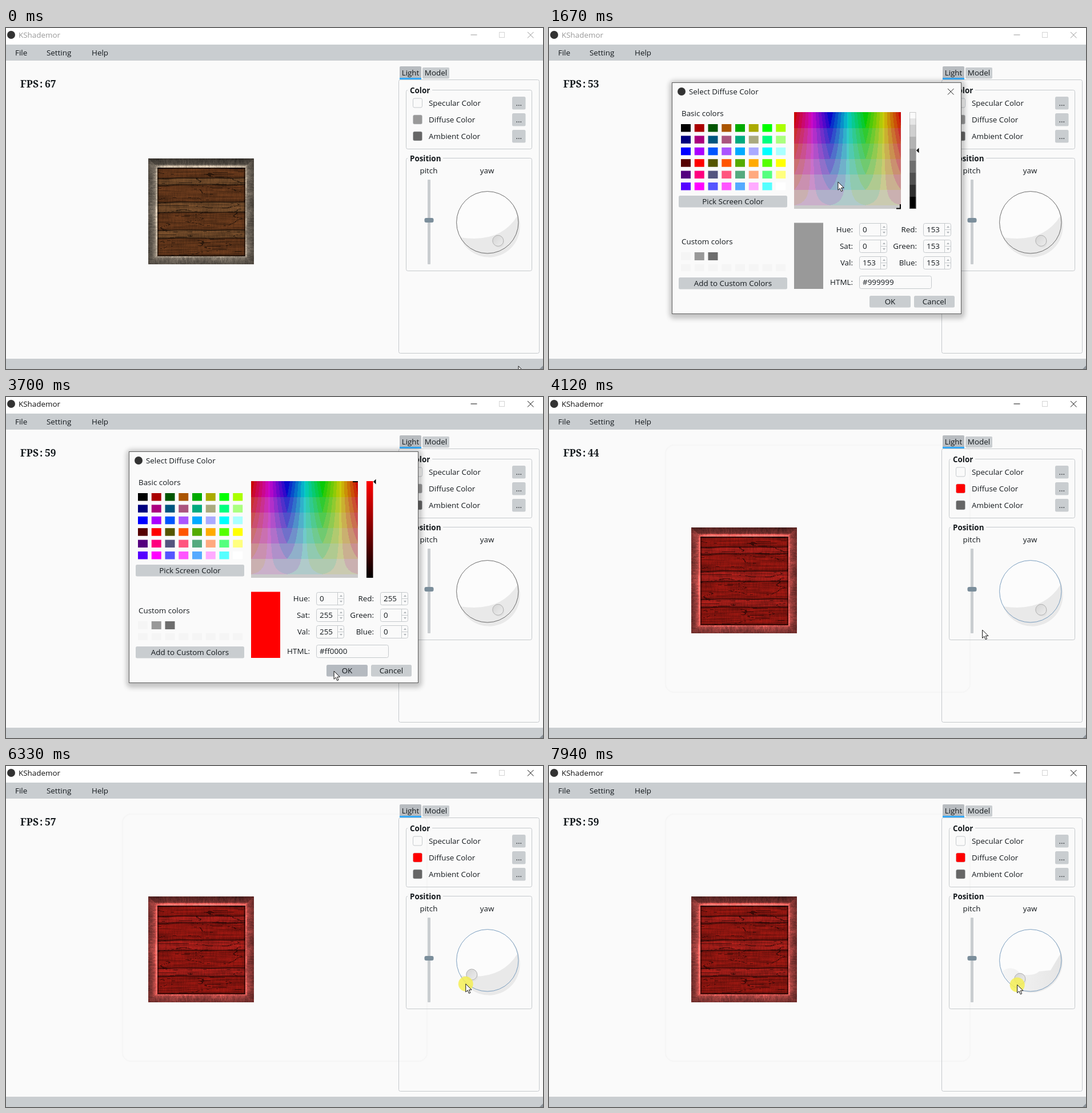
Recreate the animation shown at these times as an HTML page with a canvas. Size 940 by 596 pixels, loop 8 s.

```html
<!DOCTYPE html>
<html lang="en">
<head>
<meta charset="utf-8">
<title>Light settings</title>
<style>
html, body { margin: 0; width: 100%; height: 100%; overflow: hidden; background: #fafafa; }
svg { display: block; }
canvas { display: block; }
text { font: 13.4px "Open Sans", "Noto Sans", sans-serif; fill: #14191d; white-space: pre; }
.b { font-weight: 700; }
.fps { font: 600 17.5px "Noto Serif", serif; }
.btn { fill: #c9cdd0; }
.box { fill: none; stroke: #c5c9cc; }
</style>
</head>
<body>
<svg id="stage" width="940" height="596" viewBox="0 0 940 596">
  <defs>
    <filter id="soft" x="-10%" y="-10%" width="120%" height="120%"><feGaussianBlur stdDeviation="4"/></filter>
    <linearGradient id="fade" x1="0" y1="0" x2="1" y2="0"><stop stop-color="#f5f5f5"/><stop offset="1" stop-color="#e5e5e5"/></linearGradient>
    <linearGradient id="knob" x1="0" y1="0" x2="1" y2="1"><stop stop-color="#d4d4d4"/><stop offset="1" stop-color="#eee"/></linearGradient>
    <linearGradient id="redBar" x1="0" y1="0" x2="0" y2="1"><stop stop-color="#f00"/><stop offset="1"/></linearGradient>
  </defs>
</svg>
<script>
const LOOP = 8000;
const stage = document.getElementById('stage');
const $ = id => document.getElementById(id);

// ---- markup helpers
const rect = (x, y, w, h, a = '') => `<rect x="${x}" y="${y}" width="${w}" height="${h}" ${a}/>`;
const text = (x, y, s, a = '') => `<text x="${x}" y="${y}" ${a}>${s}</text>`;
const path = (d, a = '') => `<path d="${d}" ${a}/>`;
const mid = 'text-anchor="middle"', end = 'text-anchor="end"';
const button = (id, x, y, w, h, s) =>
  rect(x, y, w, h, `id="${id}" class="btn" rx="2.5"`) + text(x + w / 2, y + h / 2 + 5, s, mid);
const canvasBox = (id, x, y, w, h) =>
  `<foreignObject x="${x}" y="${y}" width="${w}" height="${h}"><canvas id="${id}" width="${w}" height="${h}"></canvas></foreignObject>`;
const group = (id, s) => `<g id="${id}">${s}</g>`;
const range = n => [...Array(n).keys()];

// ---- dial geometry
const DIAL = { x: 842.8, y: 339.8, r: 54.2, reach: 37 };

function frameMarkup() {
  return rect(0, 0, 940, 29, 'fill="#fff"') +
    '<circle cx="9" cy="12" r="7" fill="#333"/>' + text(22, 17, 'KShademor', 'id="title"') +
    path('M813.5 12h11M913 7l10.5 10.5M923.5 7L913 17.5', 'id="winBtns" fill="none"') +
    rect(863.5, 7.5, 9, 9, 'fill="none" stroke="#d4d4d4"') +
    rect(0, 29, 940, 28, 'class="btn"') +
    text(16, 48, 'File') + text(71, 48, 'Setting') + text(150, 48, 'Help') +
    rect(0, 578, 940, 18, 'class="btn"') +
    path('M934 596l6-6v6z', 'fill="#8b9299"') +
    text(25, 104, 'FPS', 'class="fps"') + text(59, 104, ':', 'class="fps"') + text(68, 104, '', 'id="fps" class="fps"');
}

function panelMarkup() {
  const rows = ['Specular', 'Diffuse', 'Ambient'].map((name, i) => {
    const y = 120 + 29 * i;
    return rect(712.5, y + 3, 16, 16, `id="sw${i}" rx="2.5" stroke="#c5c9cc" stroke-width="${i ? .5 : 1}" fill="${['#fafafa', '#999', '#666'][i]}"`) +
      text(740, y + 16, name + ' Color') + button('more' + i, 886, y, 23.5, 22.5, '...');
  }).join('');
  const box = (y, h, name, w) => rect(700.5, y, 220, h, 'class="box" rx="3"') +
    rect(703, y - 3, w, 6, 'fill="#fafafa"') + text(707, y + 5.5, name, 'class="b"');
  const { x, y, r } = DIAL;
  return rect(687.5, 90.5, 246, 478, 'class="box" rx="3"') +
    rect(689, 67, 38, 23, 'rx="2" fill="#b8bcc0"') + rect(689, 87, 38, 3, 'fill="#36a9f6"') +
    rect(729, 69, 47, 19.5, 'class="btn" rx="2"') +
    text(708, 83, 'Light', mid) + text(752.5, 83, 'Model', mid) +
    box(108.5, 103, 'Color', 43) + rows + box(227.5, 197, 'Position', 62) +
    text(740, 254, 'pitch', mid) + text(842, 254, 'yaw', mid) +
    rect(738, 265, 5, 148, 'class="btn" rx="1"') + rect(732.5, 332, 16, 8, 'rx="3" fill="#7b8e9b"') +
    `<circle cx="${x + 1.6}" cy="${y + 1.6}" r="${r + .5}" fill="#e8e8e8"/><circle cx="${x}" cy="${y}" r="${r}" fill="#fcfcfc"/>` +
    path('', 'id="shade"') +
    `<circle id="ring" cx="${x}" cy="${y}" r="${r}" fill="none" stroke-width=".9"/>` +
    group('knobAt', '<circle cx="2" cy="3" r="9" fill="#dcdcdc" opacity=".6"/><circle r="9.5" fill="url(#knob)" stroke="#b0b0b0"/>');
}

function dialogMarkup() {
  const basic = range(48).map(i => {
    const b = i % 3, r = (i / 3 | 0) % 4, g = i / 12 | 0;
    return rect(231 + 23.75 * (i / 6 | 0), 168 + 20.4 * (i % 6), 17, 13.5,
      `fill="rgb(${r * 85},${g * 85},${Math.floor(b * 127.5)})"`);
  }).join('');
  const custom = ['#f5f5f5', '#999', '#6d6d6d'].map((c, i) => rect(231 + 23.75 * i, 392, 17, 14, `fill="${c}"`)).join('') +
    range(8).map(i => rect(231 + 23.75 * i, 413, 17, 12, 'fill="#f5f5f5"')).join('');
  const spin = (id, x, y, label) => text(x - 11, y + 16, label, end) +
    rect(x + .5, y + .5, 48, 22, 'class="box" rx="3"') + path(`M${x + 37.5} ${y + 1}v21M${x + 38} ${y + 11.5}h10`, 'class="box"') +
    path(`M${x + 41} ${y + 8}l2.5-3 2.5 3zM${x + 41} ${y + 15}l2.5 3 2.5-3z`, 'fill="#aeb3b7"') +
    text(x + 6, y + 16, '', `id="${id}"`);
  const spins = ['Hue', 'Sat', 'Val', 'Red', 'Green', 'Blue'].map((n, i) =>
    spin('num' + i, i < 3 ? 543 : 655, 341 + 29 * (i % 3), n + ':')).join('');
  const grays = [250, 230, 207, 179, 148, 110, 80, 46, 0].map((v, i) => {
    const y = i < 2 ? 147 + 11 * i : 169 + 21 * (i - 2);
    return rect(631, y, 11.5, i < 2 ? 11 : 21, `fill="rgb(${v},${v},${v})"`);
  }).join('');
  return rect(211, 92, 517, 416, 'rx="8" fill="#000" opacity=".22" filter="url(#soft)"') +
    rect(215.5, 95.5, 506, 404, 'fill="#fafafa" stroke="#5c5c5c"') +
    '<circle cx="232" cy="111" r="7" fill="#333"/>' + text(245, 116, 'Select Diffuse Color') +
    path('M698 106l10.5 10.5M708.5 106L698 116.5', 'id="dlgX" stroke="#222"') +
    text(232, 154, 'Basic colors') + basic + button('pick', 227, 293, 190, 20.5, 'Pick Screen Color') +
    text(232, 378, 'Custom colors') + custom + button('add', 227, 436, 190, 20.5, 'Add to Custom Colors') +
    canvasBox('hues', 429, 147, 187, 169) + path('', 'id="cross" stroke="#000" stroke-width="2" fill="none"') +
    group('grayBar', grays + rect(631.5, 147.5, 10.5, 168, 'fill="none" stroke="#999" stroke-opacity=".5"')) +
    rect(631, 147, 11.5, 169, 'id="red" fill="url(#redBar)"') + path('', 'id="mark"') +
    rect(429, 340.5, 51, 115.5, 'id="preview"') + spins +
    text(532, 449, 'HTML:', end) + rect(543.5, 433.5, 126, 22, 'class="box" rx="3"') + text(549, 449, '', 'id="html"') +
    button('ok', 561, 468, 72, 20.5, 'OK') + button('cancel', 639, 468, 71, 20.5, 'Cancel');
}

stage.insertAdjacentHTML('beforeend',
  frameMarkup() +
  rect(204, 84, 533, 432, 'id="trace" rx="15" fill="none" stroke="#f6f6f6" stroke-width="2.5"') +
  group('wood', canvasBox('crate', 249, 228, 185, 185)) +
  group('woodRed', canvasBox('crateRed', 249, 228, 185, 185)) +
  panelMarkup() + group('dialog', dialogMarkup()) +
  '<circle id="press" r="13" fill="#f4ee55" opacity=".85"/>' +
  path('M0 0v14.2l3.3-3 2.3 5.3 2.4-1-2.3-5.2h4.6z', 'id="cursor" fill="#fff" stroke="#111" stroke-linejoin="round"'));

// ---- pixel textures
function fillPixels(id, shader) {
  const c = $(id), ctx = c.getContext('2d'), img = ctx.createImageData(c.width, c.height);
  for (let y = 0, p = 0; y < c.height; y++)
    for (let x = 0; x < c.width; x++, p += 4) {
      const rgb = shader(x, y);
      for (let k = 0; k < 3; k++) img.data[p + k] = rgb[k];
      img.data[p + 3] = 255;
    }
  ctx.putImageData(img, 0, 0);
}

const hash = (x, y) => { const s = Math.sin(x * 127.1 + y * 311.7) * 43758.5453; return s - Math.floor(s); };
function noise(x, y) {
  const i = Math.floor(x), j = Math.floor(y), s = v => v * v * (3 - 2 * v), u = s(x - i), v = s(y - j);
  const mix = (a, b, k) => a + (b - a) * k;
  return mix(mix(hash(i, j), hash(i + 1, j), u), mix(hash(i, j + 1), hash(i + 1, j + 1), u), v);
}

const isInner = (x, y) => x > 15 && x < 170 && y > 15 && y < 171;
const EDGES = [16, 34, 46, 76, 94, 125, 139, 171];
function plank(x, y) {
  const wave = y + 2 * (noise(x / 28, y / 60) - .5);
  let k = 0;
  while (k < 6 && wave > EDGES[k + 1]) k++;
  const gap = Math.min(Math.abs(wave - EDGES[k]), Math.abs(wave - EDGES[k + 1]));
  let v = .72 + .34 * noise(x / 26, y / 1.8 + k * 9) + .16 * (noise(x / 1.4, y / 9) - .5) + .1 * (hash(x, y) - .5);
  if (Math.abs(noise(x / 60 + k * 5, y / 5) - .5) < .016) v *= .5;
  if (gap < 2) v *= .4 + .3 * gap;
  const side = Math.min(x - 15, 170 - x, y - 15, 171 - y);
  if (side < 4) v *= .3 + .17 * side;
  return (k % 2 ? [118, 77, 43] : [102, 56, 27]).map(c => c * v);
}
function border(x, y) {
  const d = Math.min(x, y, 184 - x, 184 - y);
  const flat = Math.min(y, 184 - y) < Math.min(x, 184 - x);
  const grain = flat ? noise(x / 1.8, y / 5) : noise(x / 5, y / 1.8);
  let v = 92 + 60 * Math.pow(d / 15, 1.4) + 30 * (noise(x / 16, y / 16) - .5);
  if (y < 11 && flat) v *= .66;
  if (x > 170 && !flat) v *= .9;
  v *= .72 + .3 * grain + .2 * hash(x, y);
  if (d >= 12) v += 50 * noise(x / 14, y / 14);
  if (d >= 14) v += 30;
  return [v, v * .92, v * .82];
}
const wood = (x, y) => (isInner(x, y) ? plank : border)(x, y);
fillPixels('crate', wood);
fillPixels('crateRed', (x, y) => {
  const [r, g, b] = wood(x, y);
  return isInner(x, y) ? [r * 1.45, g * .4, b * .6] : [r * 1.4, g * .62, b * .66];
});
fillPixels('hues', (x, y) => {
  const h = (1 - x / 187) * 6, s = 1 - y / 169;
  return [5, 3, 1].map(n => {
    const k = (n + h) % 6;
    const v = 200 * (1 - s * Math.max(0, Math.min(k, 4 - k, 1)));
    const level = Math.floor(v / 32);
    return level ? Math.min(level * 32 + 16, 202) : 8;
  });
});

// ---- timeline
const TRACK = [[0, 897, 591], [200, 899, 560], [520, 904, 320], [840, 897, 190], [1060, 893, 167], [1390, 893, 167],
  [1670, 506, 269], [1820, 492, 276], [2350, 268, 240], [2510, 264, 237], [2720, 264, 237], [3350, 572, 474],
  [3480, 575, 479], [3720, 574, 479], [4200, 795, 393], [4600, 855, 388], [5080, 853, 380], [5480, 848, 381],
  [5560, 845, 381], [5630, 837, 381], [5840, 822, 381], [6200, 799, 373], [6450, 810, 388], [6680, 824, 398],
  [6900, 845, 397], [7030, 862, 386], [7100, 871, 380], [7300, 869, 381], [7590, 852, 391], [7860, 822, 383], [8000, 818, 382]];
const FPS = [[0, 67], [140, 62], [360, 59], [590, 64], [820, 58], [1050, 61], [1250, 25], [1400, 38], [1600, 53],
  [1900, 58], [2200, 61], [2600, 56], [3000, 62], [3400, 57], [3650, 59], [3850, 44], [4200, 60], [4700, 58],
  [5200, 62], [5500, 59], [5900, 57], [6400, 61], [6900, 56], [7300, 60], [7800, 59]];

function cursorAt(t) {
  let i = 0;
  while (i < TRACK.length - 2 && t >= TRACK[i + 1][0]) i++;
  const [a, x, y] = TRACK[i], [b, u, v] = TRACK[i + 1], k = Math.max(0, Math.min(1, (t - a) / (b - a)));
  return [x + (u - x) * k, y + (v - y) * k];
}
const within = (t, a, b) => t >= a && t < b;
const show = (id, on) => $(id).setAttribute('visibility', on ? 'inherit' : 'hidden');
const set = (id, name, v) => $(id).setAttribute(name, v);
const label = (id, s) => { if ($(id).textContent !== String(s)) $(id).textContent = s; };

// The knob trails the cursor and cannot enter the gap at the bottom.
function knobAngle(t) {
  const gap = Math.PI / 6;
  if (t < 5600) return gap;
  const [x, y] = cursorAt(t - 70), a = Math.atan2(x - DIAL.x, y - DIAL.y);
  return (a < 0 ? -1 : 1) * Math.max(gap, Math.abs(a));
}

function draw(t) {
  const [x, y] = cursorAt(t), opened = within(t, 1430, 3750);
  const active = within(t, 1180, 1430) || t >= 3660;
  const focus = within(t, 1180, 1430) || t >= 3750;
  const picked = t >= 2650, applied = t >= 3750;

  label('fps', FPS.filter(f => f[0] <= t).pop()[1]);
  set('title', 'style', `fill:${active ? '#111' : '#999'}`);
  set('winBtns', 'stroke', active ? '#111' : '#999');
  show('wood', !applied);
  show('woodRed', applied);
  show('trace', applied);
  set('sw1', 'fill', applied ? '#f00' : '#999');

  set('ring', 'stroke', focus ? '#6d93b8' : '#5c5c5c');
  const worn = t > 6600;
  set('shade', 'd', worn
    ? 'M793 359Q812 346 826 364Q848 368 858 359L878 357L896 327A54 54 0 0 1 793 359Z'
    : 'M795 366Q866 377 896 327A54 54 0 0 1 795 366Z');
  set('shade', 'fill', worn ? 'url(#fade)' : '#e9e9e9');
  const a = knobAngle(t);
  set('knobAt', 'transform', `translate(${DIAL.x + DIAL.reach * Math.sin(a)} ${DIAL.y + DIAL.reach * Math.cos(a)})`);

  show('dialog', opened);
  show('dlgX', opened && t < 3660);
  show('grayBar', opened && !picked);
  show('red', opened && picked);
  set('cross', 'd', picked ? 'M607 148H616' : 'M608 315.5H615V308');
  set('mark', 'd', `M643 ${picked ? 148 : 214}l4.5-4.5v9z`);
  set('preview', 'fill', picked ? '#f00' : '#999');
  (picked ? [0, 255, 255, 255, 0, 0] : [0, 0, 153, 153, 153, 153]).forEach((v, i) => label('num' + i, v));
  label('html', picked ? '#ff0000' : '#999999');

  const hover = (id, on) => {
    const r = $(id), n = k => +r.getAttribute(k);
    const inside = x >= n('x') && x <= n('x') + n('width') && y >= n('y') && y <= n('y') + n('height');
    r.style.fill = on && inside ? '#b5bac0' : '';
  };
  range(3).forEach(i => hover('more' + i, !opened));
  ['ok', 'cancel', 'pick', 'add'].forEach(id => hover(id, opened));

  show('press', within(t, 1180, 1290) || within(t, 2580, 2690) || within(t, 3540, 3650) || t >= 5520);
  set('press', 'cx', x);
  set('press', 'cy', y);
  set('cursor', 'transform', `translate(${x} ${y})`);
}

const start = performance.now();
function tick(now) {
  draw(Math.max(0, now - start) % LOOP);
  requestAnimationFrame(tick);
}
draw(0);
requestAnimationFrame(tick);
</script>
</body>
</html>
```
